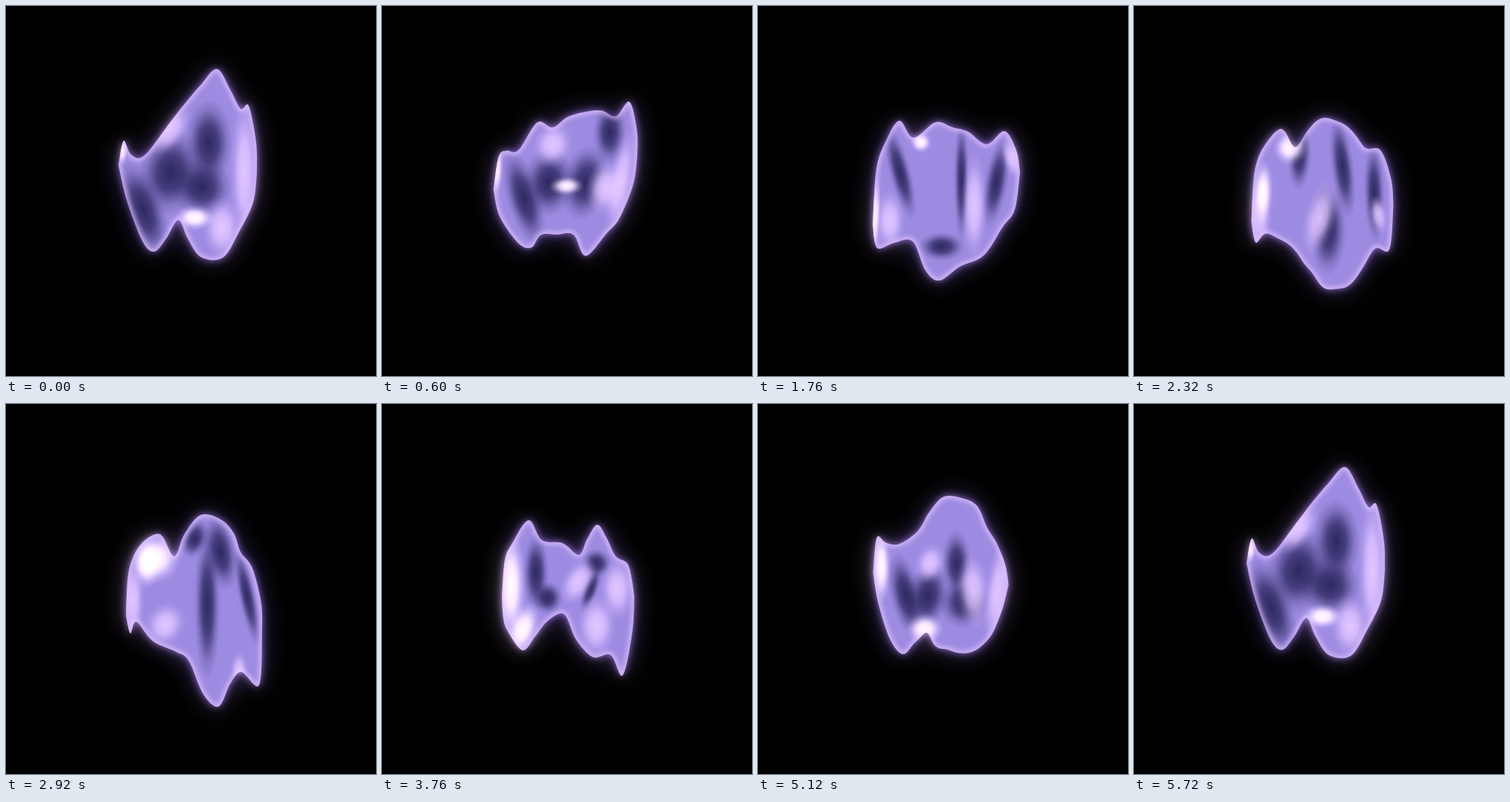
Animation of 500x500 px, one loop 5.76 s. Source, as an HTML page with a canvas:

```html
<!DOCTYPE html>
<html>
<head>
<meta charset="utf-8">
<style>
html, body { margin: 0; width: 100%; height: 100%; overflow: hidden; background: #000; }
canvas { display: block; }
</style>
</head>
<body>
<canvas id="stage" width="500" height="500"></canvas>
<script>
const LOOP = 5760, SAMPLES = 100, SIZE = 500;
const ctx = document.getElementById('stage').getContext('2d');
const layer = document.createElement('canvas');
layer.width = layer.height = SIZE;
const g = layer.getContext('2d');

// Evenly indexed Catmull-Rom samples of a flat x,y list
function spline(pts) {
  const last = pts.length / 2 - 1, out = [];
  const at = (i, k) => pts[Math.max(0, Math.min(last, i)) * 2 + k];
  for (let s = 0; s < SAMPLES; s++) {
    const u = s / (SAMPLES - 1) * last, i = Math.min(last - 1, Math.floor(u)), f = u - i;
    for (let k = 0; k < 2; k++) {
      const a = at(i - 1, k), b = at(i, k), c = at(i + 1, k), d = at(i + 2, k);
      out.push(b + f / 2 * (c - a + f * (2 * a - 5 * b + 4 * c - d + f * (3 * (b - c) + d - a))));
    }
  }
  return out;
}

// Edges run left to right, the bottom sharing the ends of the top.
// Shading spots are x, y, rx, ry, degrees.
const poses = [
  {
    time: 0,
    top: [152,215, 159,182, 169,201, 187,202, 222,157, 240,134, 262,108, 285,85, 303,113,
      317,139, 328,135, 338,185, 339,225],
    bottom: [163,262, 184,317, 200,332, 216,315, 233,289, 245,313, 263,339, 293,340, 315,305, 334,265],
    dark: [185,275,20,50,-20, 222,225,30,42,10, 265,245,28,30,0, 274,185,22,42,0],
    light: [222,168,14,28,35, 292,300,18,30,0, 322,225,13,75,0],
    hot: [255,286,18,12,0, 157,195,5,14,0]
  },
  {
    time: 1200,
    top: [150,285, 157,225, 169,188, 182,184, 196,161, 220,195, 238,194, 264,206, 289,174,
      314,165, 340,133, 351,160, 351,190],
    bottom: [155,310, 183,324, 203,321, 214,307, 241,335, 273,312, 289,337, 316,275, 328,270, 345,222],
    dark: [200,240,11,45,-12, 232,262,18,22,0, 285,235,14,45,25, 341,165,8,22,5],
    light: [236,220,22,16,0, 310,190,18,24,20, 325,250,10,26,20],
    hot: [238,199,14,7,0, 155,255,6,40,5]
  },
  {
    time: 1760,
    top: [155,295, 160,220, 173,182, 191,155, 210,178, 240,157, 263,164, 284,170, 309,187,
      333,169, 349,195, 354,225],
    bottom: [161,327, 184,320, 209,318, 226,357, 245,371, 273,352, 305,337, 331,298, 347,275],
    dark: [192,225,10,48,-15, 248,325,22,14,0, 275,235,7,60,0, 322,238,11,45,10],
    light: [178,290,14,30,0, 292,270,12,52,0, 343,205,9,22,-15],
    hot: [220,184,10,10,30, 158,285,5,40,3]
  },
  {
    time: 2920,
    top: [162,285, 166,225, 182,190, 208,176, 227,206, 241,176, 263,150, 290,156, 308,175,
      317,200, 333,222, 345,270, 346,310],
    bottom: [168,310, 176,294, 198,320, 230,335, 247,347, 266,391, 287,409, 303,378, 318,362, 342,380],
    dark: [255,182,12,20,20, 272,270,12,75,0, 290,200,15,38,-10, 326,260,8,50,-12],
    light: [172,265,10,40,0, 215,298,18,22,30, 315,360,8,18,0],
    hot: [203,208,22,24,0, 190,215,14,24,0]
  },
  {
    time: 3760,
    top: [162,260, 166,211, 175,190, 198,157, 216,184, 244,188, 266,204, 277,183, 291,163,
      304,182, 316,206, 333,218, 341,260],
    bottom: [164,290, 170,307, 190,333, 207,314, 224,293, 246,284, 262,318, 285,342, 309,339,
      325,367, 338,310],
    dark: [208,228,12,38,0, 224,262,14,16,0, 290,215,14,14,30, 282,250,7,24,20],
    light: [265,240,14,25,30, 290,300,18,30,0, 318,250,16,30,0],
    hot: [190,305,14,28,20, 174,245,14,55,0]
  },
  {
    time: 4520,
    top: [159,245, 162,184, 176,175, 193,175, 208,187, 224,163, 241,151, 270,176, 290,166,
      303,195, 317,234, 331,243, 339,260],
    bottom: [162,280, 174,321, 194,343, 210,324, 225,321, 238,347, 266,338, 290,331, 311,314,
      316,323, 329,285],
    dark: [214,240,9,35,-5, 236,292,10,22,10, 292,285,18,20,30, 268,245,5,24,0],
    light: [245,262,14,12,0, 290,210,13,42,-5, 325,280,11,28,15],
    hot: [195,315,16,18,0, 175,245,13,60,0]
  }
];
for (const p of poses) {
  const bottom = [...p.top.slice(0, 2), ...p.bottom, ...p.top.slice(-2)];
  p.values = [...spline(p.top), ...spline(bottom), ...p.dark, ...p.light, ...p.hot];
}

// Gentle Hermite blend between neighbouring poses
function valuesAt(time) {
  const n = poses.length;
  const key = i => {
    const p = poses[(i + n) % n];
    return { v: p.values, t: p.time + Math.floor(i / n) * LOOP };
  };
  let i = n - 1;
  while (poses[i].time > time) i--;
  const a = key(i - 1), b = key(i), c = key(i + 1), d = key(i + 2);
  const span = c.t - b.t, f = (time - b.t) / span, f2 = f * f, f3 = f2 * f;
  const m0 = .5 * span / (c.t - a.t), m1 = .5 * span / (d.t - b.t), w = 3 * f2 - 2 * f3;
  return b.v.map((v, j) => v + (c.v[j] - v) * w
    + (f3 - 2 * f2 + f) * m0 * (c.v[j] - a.v[j])
    + (f3 - f2) * m1 * (d.v[j] - v));
}

const BASE = 'rgb(138,122,198)';
const tint = i => i < 4 ? '28,25,72' : i < 7 ? '205,180,232' : '255,238,255';

function spot(x, y, rx, ry, deg, rgb) {
  g.save();
  g.translate(x, y);
  g.rotate(deg * Math.PI / 180);
  g.scale(Math.max(1, rx) * 1.45, Math.max(1, ry) * 1.4);
  const soft = g.createRadialGradient(0, 0, 0, 0, 0, 1);
  soft.addColorStop(0, `rgba(${rgb},.9)`);
  soft.addColorStop(.4, `rgba(${rgb},.7)`);
  soft.addColorStop(.75, `rgba(${rgb},.2)`);
  soft.addColorStop(1, `rgba(${rgb},0)`);
  g.fillStyle = soft;
  g.fillRect(-1, -1, 2, 2);
  g.restore();
}

function drawCloth(v) {
  const edge = SAMPLES * 2, shape = new Path2D();
  for (let i = 0; i < edge; i += 2) shape.lineTo(v[i], v[i + 1]);
  for (let i = edge * 2 - 2; i >= edge; i -= 2) shape.lineTo(v[i], v[i + 1]);
  shape.closePath();

  g.clearRect(0, 0, SIZE, SIZE);
  g.save();
  g.clip(shape);
  g.fillStyle = BASE;
  g.fillRect(0, 0, SIZE, SIZE);
  const spots = v.slice(edge * 2);
  for (let i = 0; i < spots.length / 5; i++) spot(...spots.slice(i * 5, i * 5 + 5), tint(i));
  g.filter = 'blur(3px)';
  g.strokeStyle = 'rgba(240,205,255,.7)';
  g.lineWidth = 6;
  g.stroke(shape);
  g.restore();
}

function stamp(filter, alpha, mode) {
  ctx.filter = filter;
  ctx.globalAlpha = alpha;
  ctx.globalCompositeOperation = mode;
  ctx.drawImage(layer, 0, 0);
}

function frame(now) {
  drawCloth(valuesAt(now % LOOP));
  ctx.filter = 'none';
  ctx.globalAlpha = 1;
  ctx.globalCompositeOperation = 'source-over';
  ctx.fillStyle = '#000';
  ctx.fillRect(0, 0, SIZE, SIZE);
  stamp('blur(16px) saturate(2)', .4, 'lighter');
  stamp('blur(5px) saturate(1.8)', .5, 'lighter');
  stamp('none', 1, 'source-over');
  stamp('blur(6px)', .14, 'lighter');
  requestAnimationFrame(frame);
}
requestAnimationFrame(frame);
</script>
</body>
</html>
```
